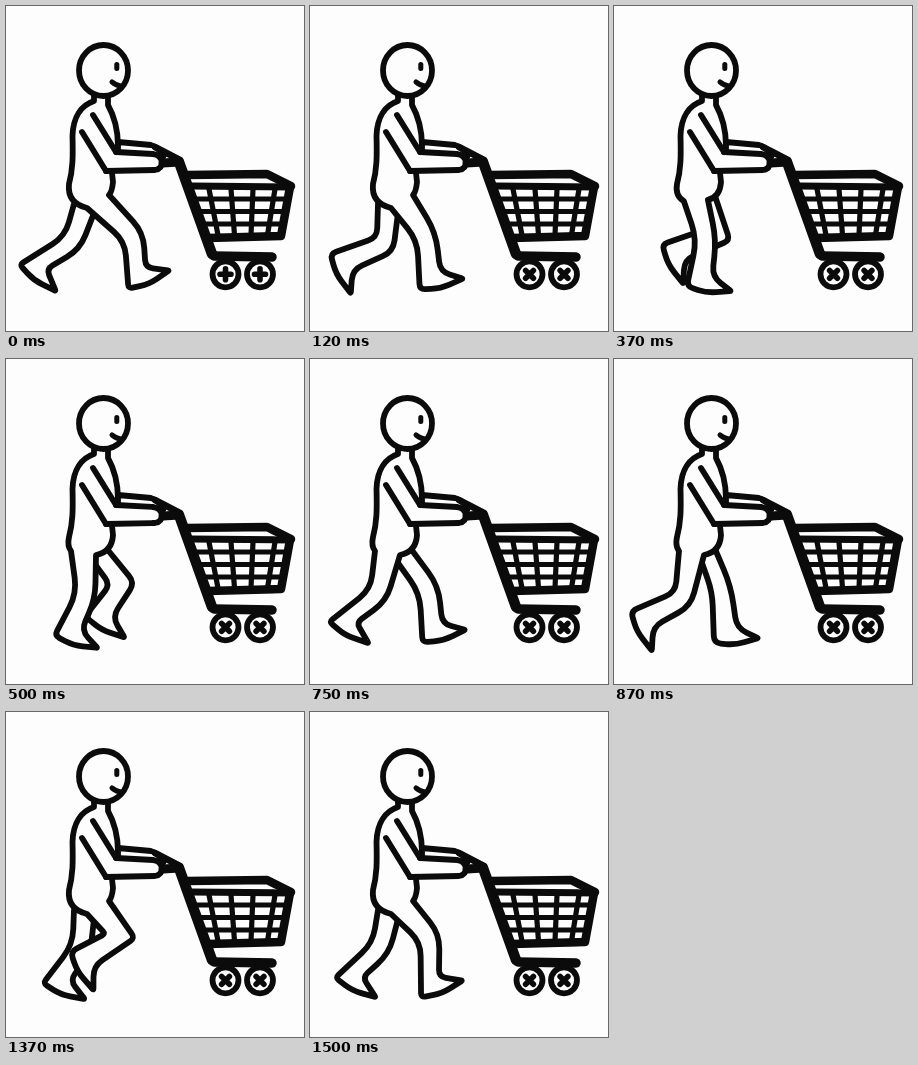
Animation of 298x325 px, one loop 1.62 s. Source, as an HTML page:

```html
<!DOCTYPE html>
<html lang="en">
<head>
<meta charset="utf-8">
<title>Walking with a shopping cart</title>
<style>
html, body { margin: 0; width: 100%; height: 100%; overflow: hidden; background: #fdfdfd; }
svg { display: block; width: 100vw; height: 100vh; }
.line { fill: none; stroke: #0b0b0b; stroke-width: 5.8; stroke-linecap: round; stroke-linejoin: round; }
.skin { fill: #fdfdfd; }
</style>
</head>
<body>
<svg viewBox="0 0 298 325">
  <g class="line">
    <path id="far" class="skin"/>
    <path id="near" class="skin"/>
    <path class="skin" d="M112 136L145 139Q150 140 158 149L152 160L112 148Z"/>
    <path class="skin" d="M100 165L149 164Q156 163 156 156Q155 149 147 148L110 146"/>
    <path d="M87 109L110 146M76 126L100 165"/>
    <ellipse class="skin" cx="97.5" cy="64.5" rx="24.5" ry="25.5"/>
    <path id="eye" stroke-width="5"/>
    <path d="M106 76Q110 79.5 116 80.5" stroke-width="5"/>
  </g>
  <g class="line">
    <path d="M149 141L174 154" stroke-width="6.5"/>
    <path d="M157 157L173 156" stroke-width="9"/>
    <path d="M173 156L206 248" stroke-width="10.5"/>
    <path d="M208 250L266 251" stroke-width="9.5"/>
    <path d="M181 169L261 168L285 180" stroke-width="8.5"/>
    <path d="M186 180L285 181" stroke-width="7"/>
    <path d="M284 181L275 230L202 232" stroke-width="8.5"/>
    <path id="grid" stroke-width="5.2"/>
  </g>
  <g class="line" id="wheels"></g>
</svg>
<script>
const $ = id => document.getElementById(id);
const LOOP = 1620, STEPS = 13;
const HIP = [86, 193], KNEE = 9.5;

// One stride: phase, knee x y, ankle x y, foot angle. Both legs share it.
const stride = [
  [0, 128, 231, 131, 272, -15],
  [2, 105, 230, 109, 277, 5],
  [4, 80, 237, 62, 274, 25],
  [6.4, 66, 236, 27, 261, 40],
  [7, 69, 240, 28, 260, 71],
  [9, 90, 235, 40, 245, 74],
  [11, 114, 224, 76, 247, 68],
  [12, 120, 226, 120, 275, -13]
];
stride.push([STEPS, ...stride[0].slice(1)]);

const mix = (a, b, u) => a.map((v, i) => v + (b[i] - v) * u);
const unit = (x, y) => [x / Math.hypot(x, y), y / Math.hypot(x, y)];
const ramp = (v, from, to) => Math.min(1, Math.max(0, (v - from) / (to - from)));

function pose(phase) {
  phase %= STEPS;
  const k = stride.findIndex(p => p[0] > phase);
  const a = stride[k - 1], b = stride[k];
  return mix(a, b, (phase - a[0]) / (b[0] - a[0])).slice(1);
}

// Points around knee and foot, from the back of the knee to its front
function limb([kx, ky, ax, ay, angle]) {
  const thigh = unit(kx - HIP[0], ky - HIP[1]), shin = unit(ax - kx, ay - ky);
  const [mx, my] = unit(thigh[0] + shin[0], thigh[1] + shin[1]);
  const w = KNEE / (mx * shin[0] + my * shin[1]);
  const c = Math.cos(angle * Math.PI / 180), s = Math.sin(angle * Math.PI / 180);
  const foot = (along, down) => [ax + along * c - down * s, ay + along * s + down * c];
  return [
    [kx - my * w, ky + mx * w],
    foot(-11, 8), foot(10, 9), foot(33, 1), foot(11, -8),
    [kx + my * w, ky - mx * w]
  ];
}

// Open bends get a wide curve, sharp ones stay tight
function outline(pts) {
  let d = "";
  for (let i = 1; i < pts.length - 1; i++) {
    const [x, y] = pts[i];
    const [a, b] = [pts[i - 1], pts[i + 1]].map(([px, py]) => {
      const len = Math.hypot(px - x, py - y);
      return { x: (px - x) / len, y: (py - y) / len, len };
    });
    const open = (1 - a.x * b.x - a.y * b.y) / 2;
    const r = Math.min(1 + 18 * open * open, a.len * 0.45, b.len * 0.45);
    d += `L${x + a.x * r} ${y + a.y * r}Q${x} ${y} ${x + b.x * r} ${y + b.y * r}`;
  }
  return d + "L" + pts[pts.length - 1].join(" ");
}

function drawNear(phase) {
  const p = pose(phase), fwd = ramp(p[0], 85, 110);
  const back = mix([65, 192], [81, 202], fwd);
  const groin = mix([90, 196], [103, 189], fwd);
  $("near").setAttribute("d",
    "M88 90V95C76 99 67 110 66.5 130C67 150 67 163 63 178" +
    `Q61 ${back[1] - 5} ${back.join(" ")}` + outline([back, ...limb(p), groin]) +
    `Q106 ${groin[1] - 3} 107 176L106 167M112 140C112 122 107 108 102 99V91`);
}

function drawFar(phase) {
  const p = pose(phase), fwd = ramp(p[0], 80, 95);
  const back = mix([68, 198], [88, 204], fwd);
  const front = mix([88, 207], [101, 190], fwd);
  $("far").setAttribute("d", "M" + back.join(" ") + outline([back, ...limb(p), front]));
}

$("grid").setAttribute("d",
  [0, 1, 2].map(i => `M${191 + 4 * i} ${193 + 12.5 * i}H${281 - 2 * i}`).join("") +
  [0, 1, 2, 3].map(i => `M${203 + 22 * i} 183L${212 + 16.5 * i} 229`).join(""));

$("wheels").innerHTML = [219.5, 254].map(x =>
  `<g transform="translate(${x} 268.3)"><circle r="13" stroke-width="5.8"/>
   <path class="spoke" d="M-5.5 0H5.5M0 -5.5V5.5" stroke-width="5.6"/></g>`).join("");
const spokes = document.querySelectorAll(".spoke");

function draw(step) {
  // The far foot lands a little late
  const lag = 0.65 * (1 - Math.cos(2 * Math.PI * step / STEPS));
  drawNear(step);
  drawFar(step + STEPS / 2 + lag);
  const blink = step === 2;
  $("eye").setAttribute("d", blink ? "M109 61.5L114 62.5" : "M110.8 58.5V62.5");
  const turn = step % 4.5 < 1 ? 0 : 45;
  spokes.forEach(s => s.setAttribute("transform", `rotate(${turn})`));
}

const start = performance.now();
let shown = -1;
function tick() {
  const t = (performance.now() - start) % LOOP;
  let step = STEPS - 1;
  while (step && Math.floor(step * 12.5) * 10 > t) step--;
  if (step !== shown) draw(shown = step);
  requestAnimationFrame(tick);
}
tick();
</script>
</body>
</html>
```
